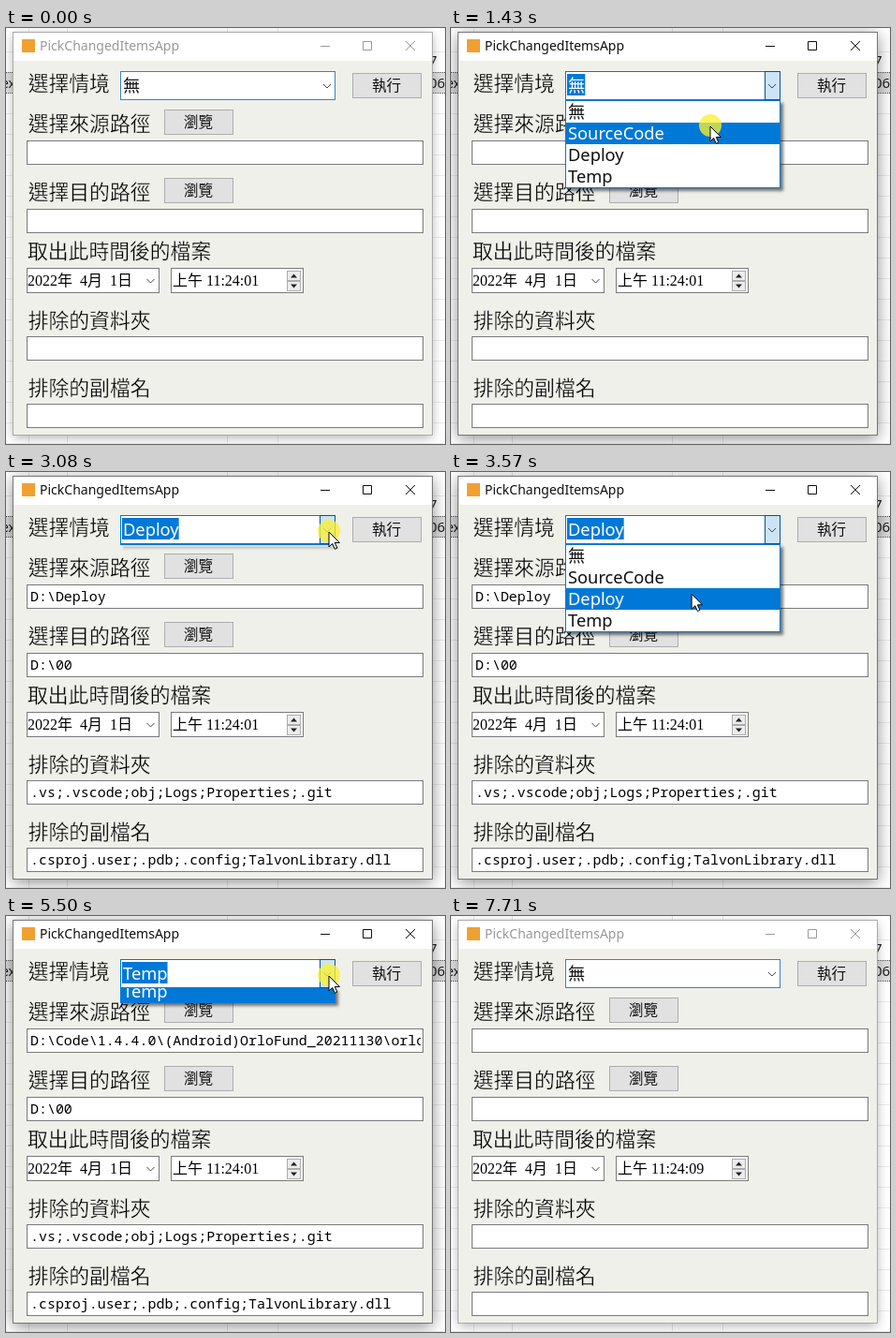
Animation, 469 px wide and 444 px high, one loop 7.77 s. Source, as an HTML page with a canvas:

```html
<!DOCTYPE html>
<html lang="zh-Hant">
<meta charset="utf-8">
<style>
  html, body { margin: 0; width: 469px; height: 444px; overflow: hidden; background: #fff }
  canvas { display: block }
</style>
<canvas id="stage" width="469" height="444"></canvas>
<script>
const g = document.getElementById('stage').getContext('2d');
const LOOP = 7770, SLIDE = 180, ROW = 23;
const BLUE = '#0078d7', PANEL = '#f0f0eb', GREY = '#7a7a7a';
const CJK = '"Noto Sans CJK TC", "Noto Sans CJK", sans-serif';
const LABEL = '300 21.8px ' + CJK, BUTTON = '300 15.6px ' + CJK;
const COMBO = '300 18.3px "Noto Sans", ' + CJK;
const DATE = '16px "Liberation Serif", "Noto Sans CJK TC", serif';
const MONO = '14.95px "Noto Sans Mono", monospace';
const SANS = '"Noto Sans", sans-serif';

const shortDirs = '.vs;.vscode;obj;Logs;Properties;.git';
const exts = '.csproj.user;.pdb;.config;', library = 'TalvonLibrary.dll';
const items = [
  { name: '無', values: ['', '', '', ''] },
  { name: 'SourceCode', values: ['D:\\Code\\MobileSite', 'D:\\00',
    '.vs;.vscode;bin;obj;Logs;Properties;GenerateModels', exts + '.code-workspace;' + library] },
  { name: 'Deploy', values: ['D:\\Deploy', 'D:\\00', shortDirs, exts + library] },
  { name: 'Temp', values: ['D:\\Code\\1.4.4.0\\(Android)OrloFund_20211130\\orlo', 'D:\\00',
    shortDirs, exts + library] }
];

// Each pick opens the list, moves to a row, clicks it, and the list closes
const picks = [
  { item: 1, open: 1050, click: 1430, close: 1580, at: [277, 105] },
  { item: 2, open: 1950, click: 2530, close: 2730, at: [270, 129] },
  { item: 3, open: 3080, click: 4110, close: 4310, at: [227, 153] },
  { item: 0, open: 5470, click: 6250, close: 6590, at: [290, 97] }
];
const ARROW = [345, 64];
const path = [[200, 330, 455], [5000, 300, 292], [7360, 310, 455]]
  .concat(picks.flatMap(p => [
    [p.open - 100, ...ARROW], [p.open + SLIDE, ...ARROW], [p.click, ...p.at], [p.close, ...p.at]
  ]))
  .sort((a, b) => a[0] - b[0]);

function pointerAt(t) {
  const i = path.findIndex(p => p[0] > t);
  if (i < 1) return [0, 500];
  const [t0, x0, y0] = path[i - 1], [t1, x1, y1] = path[i];
  const k = 1 - (1 - (t - t0) / (t1 - t0)) ** 3;
  return [x0 + (x1 - x0) * k, y0 + (y1 - y0) * k];
}

function stateAt(t) {
  const [px, py] = pointerAt(t);
  const last = picks.filter(p => p.close <= t).pop();
  return {
    px, py,
    item: last ? last.item : 0,
    list: picks.find(p => t >= p.open && t < p.close),
    pressed: picks.some(p => Math.abs(t - p.open) < 90 || t >= p.click && t < p.close),
    active: t >= 890 && t < 7640,
    selected: t >= 960 && t < 7500,
    time: t < 6590 ? '11:24:01' : '11:24:09',
    over: (x, y, w, h) => px >= x && px < x + w && py >= y && py < y + h
  };
}

function rect(x, y, w, h, fill) {
  g.fillStyle = fill;
  g.fillRect(x, y, w, h);
}

function box(x, y, w, h, border, fill = '#fff') {
  rect(x, y, w, h, border);
  rect(x + 1, y + 1, w - 2, h - 2, fill);
}

function text(s, x, y, font, color = '#000', align = 'left') {
  g.font = font;
  g.fillStyle = color;
  g.textAlign = align;
  g.fillText(s, x, y);
}

// Trims the glyph edges to get a lighter weight
function label(s, x, y) {
  text(s, x, y, LABEL);
  g.save();
  g.strokeStyle = PANEL;
  g.lineWidth = .35;
  g.strokeText(s, x, y);
  g.restore();
}

function line(points, color, close) {
  g.beginPath();
  points.forEach(p => g.lineTo(...p));
  if (close) g.closePath();
  g.strokeStyle = color;
  g.stroke();
}

const chevron = (x, y) => line([[x - 4, y - 2], [x, y + 2], [x + 4, y - 2]], '#444');

function clip(x, y, w, h, draw) {
  g.save();
  g.beginPath();
  g.rect(x, y, w, h);
  g.clip();
  draw();
  g.restore();
}

function button(x, y, s) {
  box(x, y, 74, 27, '#adadad', '#e1e1e1');
  text(s, x + 36.5, y + 18.5, BUTTON, '#111', 'center');
}

function backdrop() {
  rect(0, 0, 469, 444, '#fff');
  for (let y = 25; y < 444; y += 22) rect(0, y, 469, 1, '#ebebeb');
  for (const x of [24, 65, 236, 290]) rect(x, 0, 1, 444, '#e4e4e4');
  rect(0, 47, 469, 22, '#dcdcdc');
  g.setLineDash([1, 1]);
  for (const y of [47.5, 69.5]) line([[0, y], [469, y]], '#555');
  g.setLineDash([]);
  text('ex', -5, 64, '14px ' + SANS, '#222');
  text('7', 452, 40, '15px ' + SANS, '#222');
  text('06', 452, 64, '15px ' + SANS, '#222');
}

function windowFrame({ active }) {
  g.save();
  g.shadowColor = `rgba(0,0,0,${active ? .5 : .32})`;
  g.shadowBlur = active ? 16 : 11;
  g.shadowOffsetY = 3;
  rect(8, 5, 447, 429, '#fff');
  g.restore();
  box(7, 4, 449, 431, active ? '#777' : '#aaa');
  rect(8, 35, 447, 399, PANEL);
  rect(17, 12, 14, 14, '#f0a030');
  const ink = active ? '#111' : '#999';
  text('PickChangedItemsApp', 36, 24, '14px ' + SANS, ink);
  line([[336, 19.5], [346, 19.5]], ink);
  line([[381.5, 14.5], [390.5, 14.5], [390.5, 23.5], [381.5, 23.5]], ink, true);
  line([[427, 14], [437, 24]], ink);
  line([[437, 14], [427, 24]], ink);
}

function form({ item, list, time, over }) {
  label('選擇情境', 23.7, 67);
  label('選擇來源路徑', 23.7, 109.5);
  label('選擇目的路徑', 23.7, 182.5);
  label('取出此時間後的檔案', 23, 246);
  label('排除的資料夾', 23.7, 320);
  label('排除的副檔名', 23.7, 392);
  button(370, 48, '執行');
  button(169, 87, '瀏覽');
  button(169, 160, '瀏覽');

  [120, 193, 329, 401].forEach((y, i) => {
    box(22, y, 424, 26, !list && over(22, y, 424, 26) ? '#171717' : GREY);
    clip(24, y, 419, 26, () => text(items[item].values[i], 26, y + 17.5, MONO));
  });

  box(22, 256, 142, 27, GREY);
  text('2022年  4月  1日', 23, 275, DATE);
  chevron(154.5, 270);
  box(176, 256, 142, 27, GREY);
  text('上午 ' + time, 178, 275, DATE);
  for (const [y, dir] of [[259, -1], [270, 1]]) {
    box(300, y, 15, 11, '#adadad', '#ececec');
    const mid = y + 5.5;
    g.beginPath();
    g.moveTo(304, mid - dir * 2);
    g.lineTo(311, mid - dir * 2);
    g.lineTo(307.5, mid + dir * 2);
    g.fillStyle = '#222';
    g.fill();
  }
}

function combo({ item, list, active, selected, over }) {
  const { name } = items[item];
  box(122, 46, 230, 31, active ? BLUE : '#3b83bd');
  if (active && (list || over(122, 46, 230, 31))) box(335, 46, 17, 31, '#005499', '#cce4f7');
  chevron(343, 62);
  g.font = COMBO;
  if (selected) rect(124, 49, g.measureText(name).width + 1, 23, BLUE);
  text(name, 125, 67.5, COMBO, selected ? '#fff' : '#111');
}

function dropdown(t, { list, item, over, py }) {
  if (!list) return;
  const height = items.length * ROW + 2;
  const shown = Math.round(height * Math.min(1, (t - list.open) / SLIDE));
  const hot = over(122, 78, 230, height - 2) ? Math.floor((py - 78) / ROW) : item;
  g.save();
  g.shadowColor = 'rgba(0,0,0,.5)';
  g.shadowBlur = 3;
  g.shadowOffsetX = g.shadowOffsetY = 3;
  rect(122, 77, 230, shown, BLUE);
  g.restore();
  // The list slides down from behind the box
  clip(122, 77, 230, shown, () => {
    const top = 77 - height + shown;
    box(122, top, 230, height, BLUE);
    items.forEach(({ name }, i) => {
      const y = top + 1 + i * ROW;
      if (i === hot) rect(123, y, 228, ROW, BLUE);
      text(name, 125, y + 18, COMBO, i === hot ? '#fff' : '#111');
    });
  });
}

function pointer({ px, py, pressed }) {
  if (pressed) {
    g.beginPath();
    g.arc(px, py - 1, 12, 0, 7);
    g.fillStyle = 'rgba(250,240,50,.78)';
    g.fill();
  }
  g.save();
  g.translate(px, py);
  g.beginPath();
  for (const p of [[0, 0], [0, 16], [3.7, 12.5], [6.3, 18.3], [8.8, 17.2], [6.3, 11.5], [11.4, 11.5]])
    g.lineTo(...p);
  g.closePath();
  g.fillStyle = '#fff';
  g.fill();
  g.strokeStyle = '#000';
  g.stroke();
  g.restore();
}

function draw() {
  const t = performance.now() % LOOP;
  const state = stateAt(t);
  backdrop();
  windowFrame(state);
  form(state);
  combo(state);
  dropdown(t, state);
  pointer(state);
  requestAnimationFrame(draw);
}
draw();
</script>
</html>
```
